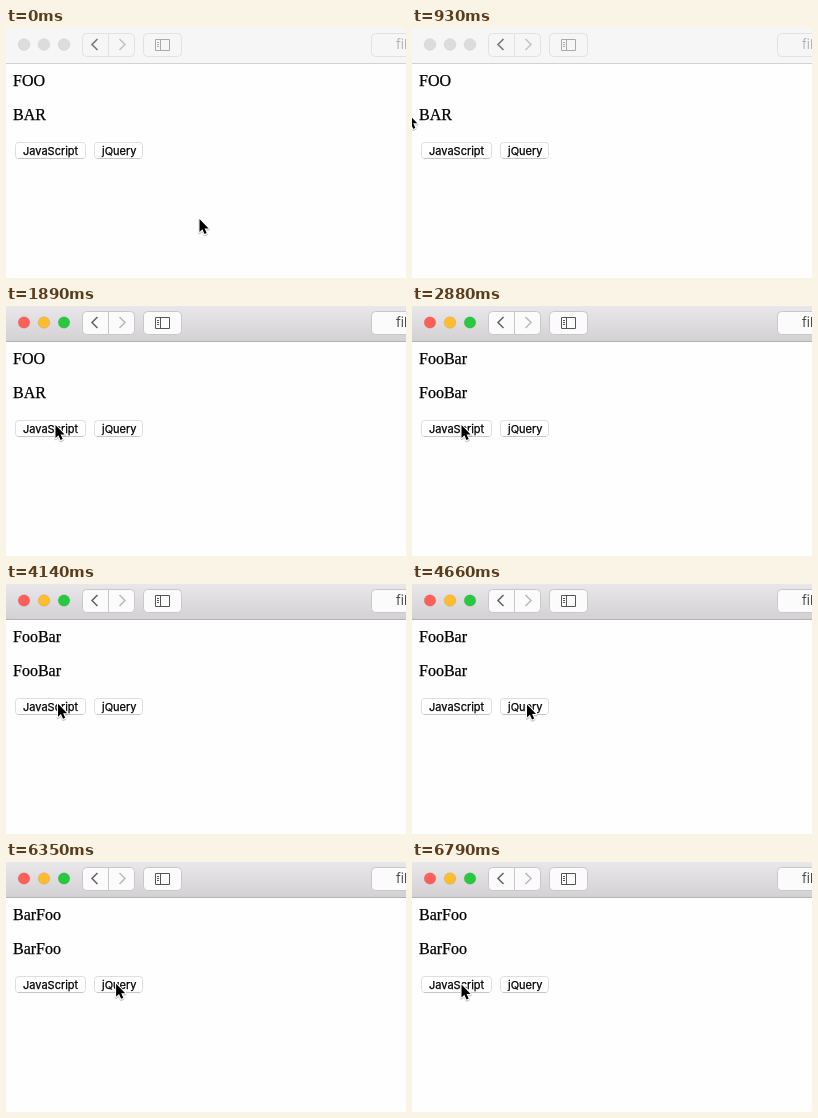
Animation, 400 px wide and 250 px high, one loop 8 s. Source, as an HTML page:

```html
<!DOCTYPE html>
<html lang="en">
<head>
<meta charset="utf-8">
<title>Text buttons</title>
<style>
html, body { margin: 0; width: 100%; height: 100%; overflow: hidden; background: #fefefe; }
svg { display: block; }
text { font: 11px Inter, "Open Sans", sans-serif; fill: #000; stroke: #000; stroke-width: .25; }
.page { font: 16px "Liberation Serif", serif; }
.bar { fill: #f6f6f6; }
.edge { fill: #d2d2d2; }
.ctl { fill: #f6f6f6; stroke: #e2e2e2; }
.icon { fill: none; stroke: #aaa; }
.arrow { stroke-width: 1.6; }
.back { stroke: #777; }
.next { stroke: #c4c4c4; }
.lights { fill: #dcdcdc; stroke: #d2d2d2; stroke-width: .6; }
.field { font-size: 13px; fill: #b4b4b4; stroke: none; }
.active .bar { fill: url(#chrome); }
.active .edge { fill: #b4b2b4; }
.active .ctl { fill: #fbfbfb; stroke: #c9c7c9; }
.active .icon { stroke: #555; }
.active .back { stroke: #666; }
.active .next { stroke: #bcbcbc; }
.active .field { fill: #4a4a4a; }
.active .lights { stroke: #0002; }
.active .lights :nth-child(1) { fill: #ff5f57; }
.active .lights :nth-child(2) { fill: #ffbd2e; }
.active .lights :nth-child(3) { fill: #28c940; }
.btn rect { fill: #fff; stroke: #dedede; }
.btn path { stroke: #c6c6c6; }
.down rect { fill: url(#blue); stroke: #2a78e8; }
.down path { stroke: #0a50c8; }
.down text { fill: #fff; stroke: #fff; }
</style>
</head>
<body>
<svg id="stage" width="400" height="250" viewBox="0 0 400 250">
  <defs>
    <linearGradient id="chrome" x2="0" y2="1">
      <stop stop-color="#e9e7e9"/><stop offset="1" stop-color="#d3d1d3"/>
    </linearGradient>
    <linearGradient id="blue" x2="0" y2="1">
      <stop stop-color="#4f9df8"/><stop offset="1" stop-color="#0b61e6"/>
    </linearGradient>
  </defs>

  <rect class="bar" width="400" height="35"/>
  <rect class="edge" y="35" width="400" height="1"/>
  <g class="lights">
    <circle cx="18" cy="16.5" r="5.8"/><circle cx="38" cy="16.5" r="5.8"/><circle cx="58" cy="16.5" r="5.8"/>
  </g>
  <g class="ctl">
    <rect x="76.5" y="5.5" width="52" height="23" rx="4"/>
    <path d="M102.5 6v22"/>
    <rect x="137.5" y="5.5" width="38" height="23" rx="4"/>
    <rect x="365.5" y="5.5" width="60" height="23" rx="4"/>
  </g>
  <path class="icon arrow back" d="M91.5 11l-5.5 5.5 5.5 5.5"/>
  <path class="icon arrow next" d="M113.5 11l5.5 5.5-5.5 5.5"/>
  <path class="icon" d="M149.5 11.5h14v11h-14zM154.5 11.5v11M151 14.5h2M151 16.5h2M151 18.5h2"/>
  <text class="field" x="390" y="21">fil</text>

  <text class="page" x="7" y="58"></text>
  <text class="page" x="7" y="92"></text>

  <g class="btn">
    <rect x="9.5" y="114.5" width="70" height="16" rx="3"/>
    <path d="M12 130.5h65"/>
    <text x="17" y="127">JavaScript</text>
  </g>
  <g class="btn">
    <rect x="88.5" y="114.5" width="48" height="16" rx="3"/>
    <path d="M91 130.5h43"/>
    <text x="96" y="127">jQuery</text>
  </g>

  <g id="cursor" stroke-linejoin="round">
    <path d="M0 1v13l2.900-2.800 2.100 4.800 2.200-.9-2.100-4.700h4z" fill="#0003" stroke="#0003" stroke-width="2.500"/>
    <path d="M0 0v13l2.900-2.800 2.100 4.800 2.200-.9-2.100-4.700h4z" stroke="#fff" stroke-width="2" paint-order="stroke"/>
  </g>
</svg>
<script>
const LOOP = 8000, STEP = 87;
const stage = document.getElementById('stage');
const cursor = document.getElementById('cursor');
const lines = stage.querySelectorAll('.page');
const buttons = stage.querySelectorAll('.btn');

// The pointer follows one curve per move, each starting where the last ended.
const home = [193.5, 191];
const moves = [
  { at: 500, steps: 10, bend: [[60, 170], [-94, 23]], end: [33, 68] },
  { at: 1370, steps: 4, bend: [[42, 82], [66, 104]], end: [49.5, 119] },
  { at: 4140, steps: 7, bend: [[46, 121], [115, 121]], end: [115, 120.5] },
  { at: 6350, steps: 6, bend: [[115, 123], [49, 126]], end: [49.5, 122.5] }
];

function bezier(a, b, c, d, u) {
  const v = 1 - u;
  return v * v * v * a + 3 * v * v * u * b + 3 * v * u * u * c + u * u * u * d;
}

function pointerAt(t) {
  let place = home;
  for (const { at, steps, bend: [b, c], end } of moves) {
    if (t < at) break;
    // The small lead keeps the last step from arriving late.
    const u = Math.min(1, Math.floor((t - at + 5) / STEP + 1) / steps);
    place = place.map((a, i) => bezier(a, b[i], c[i], end[i], u));
  }
  return place;
}

const within = (t, from, to) => t >= from && t < to;

function draw(now) {
  const t = now % LOOP;
  const words = t < 2880 ? ['FOO', 'BAR'] : t < 5910 ? ['FooBar', 'FooBar'] : ['BarFoo', 'BarFoo'];
  lines.forEach((line, i) => line.textContent = words[i]);
  stage.classList.toggle('active', t >= 1890);
  buttons[0].classList.toggle('down', within(t, 2700, 2880));
  buttons[1].classList.toggle('down', within(t, 5730, 5910));
  cursor.setAttribute('transform', `translate(${pointerAt(t)})`);
}

const start = performance.now();
function tick() {
  draw(performance.now() - start);
  requestAnimationFrame(tick);
}
tick();
</script>
</body>
</html>
```
